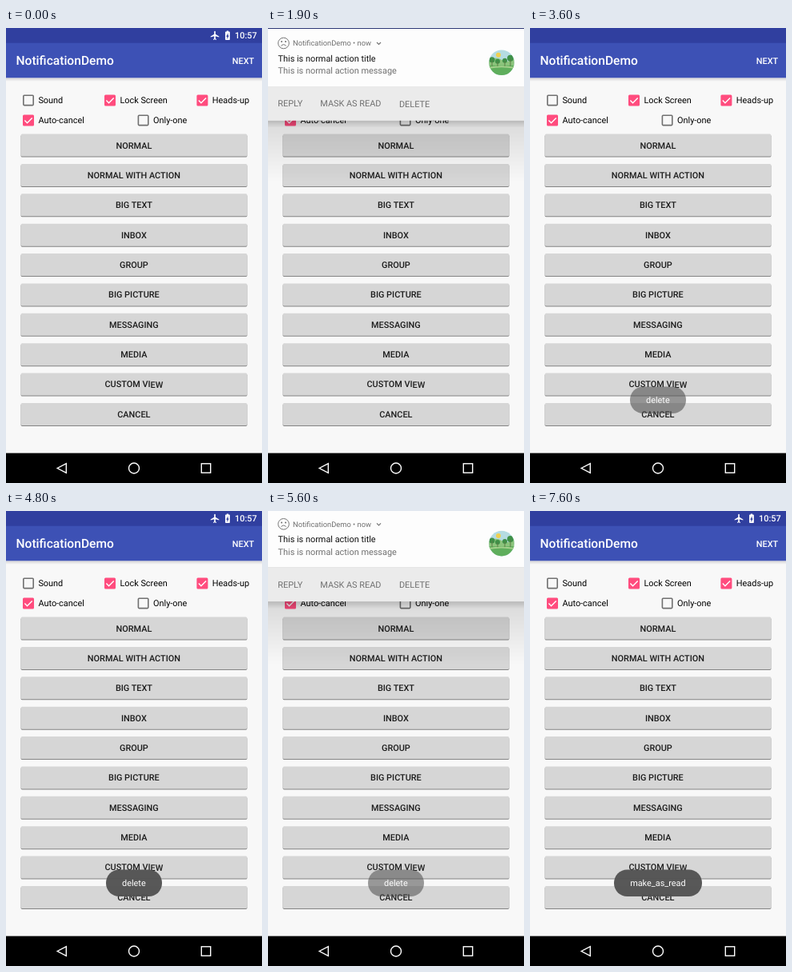
Write an HTML page that moves like this. It is 320 by 569 pixels and loops after 8 s.

```html
<!DOCTYPE html>
<html lang="en">
<head>
<meta charset="utf-8">
<title>Notification demo</title>
<style>
  html, body { margin: 0; width: 100%; height: 100%; overflow: hidden; background: #000; }
  svg { display: block; width: 100vw; height: 100vh; }
  /* The tiny rotation keeps baselines from snapping to whole pixels */
  text { font: 10.9px Roboto, sans-serif; text-rendering: geometricPrecision; transform: rotate(.015deg); }
  .medium { font-weight: 500; }
  .title { font-size: 15.57px; }
  .small { font-size: 9.34px; }
  .mid { text-anchor: middle; }
  .btn { filter: drop-shadow(0 1px .6px #0007); }

  .status, .scrim, .panel, .ripple, .tap, .toast { animation: 8s linear infinite; }
  .status { animation-name: status; }
  .scrim { animation-name: scrim; }
  .panel { animation-name: panel; }
  .ripple { animation-name: ripple; transform-box: fill-box; transform-origin: center; }
  .tap1 { animation-name: tap1; }
  .tap2 { animation-name: tap2; }
  .toast1 { animation-name: toast1; }
  .toast2 { animation-name: toast2; }

  @keyframes status {
    0%, 16.9%, 51.9%, 61.3%, 91.3%, 100% { opacity: 1; }
    18.1%, 49.4%, 62.5%, 89.4% { opacity: 0; }
  }
  @keyframes scrim {
    0%, 16.9%, 44.5%, 61.5%, 84.2%, 100% { opacity: 0; }
    18.7%, 41.7%, 63.5%, 81% { opacity: 1; }
  }
  /* Drop in, overshoot, dip back, settle; later slide out */
  @keyframes panel {
    0%, 17.62% { transform: translateY(-126px); }
    17.63% { transform: translateY(-115px); animation-timing-function: cubic-bezier(.9, 0, .8, 1); }
    22.29% { transform: translateY(14.4px); animation-timing-function: cubic-bezier(.4, 0, .2, 1); }
    25.09% { transform: translateY(-2.5px); animation-timing-function: cubic-bezier(.4, 0, .2, 1); }
    26.95% { transform: none; }
    41.63% { transform: none; animation-timing-function: ease-in; }
    44.75%, 62.07% { transform: translateY(-126px); }
    62.08% { transform: translateY(-115px); animation-timing-function: cubic-bezier(.9, 0, .8, 1); }
    66.74% { transform: translateY(14.4px); animation-timing-function: cubic-bezier(.4, 0, .2, 1); }
    69.54% { transform: translateY(-2.5px); animation-timing-function: cubic-bezier(.4, 0, .2, 1); }
    71.4% { transform: none; }
    81% { transform: none; animation-timing-function: ease-in; }
    84.25%, 100% { transform: translateY(-126px); }
  }
  @keyframes ripple {
    0%, 14.4% { transform: scale(0); opacity: .05; }
    18.75% { transform: scale(.67); opacity: .05; }
    21.25% { transform: scale(1); opacity: .05; }
    23.75% { transform: scale(1); opacity: 0; }
    23.76%, 59.9% { transform: scale(0); opacity: 0; }
    60% { transform: scale(0); opacity: .05; }
    63.75% { transform: scale(1); opacity: .05; }
    68.75%, 100% { transform: scale(1); opacity: 0; }
  }
  @keyframes tap1 {
    0%, 38.8%, 43%, 100% { opacity: 0; }
    40%, 41.6% { opacity: .05; }
  }
  @keyframes tap2 {
    0%, 77%, 82.5%, 100% { opacity: 0; }
    78.2%, 81% { opacity: .05; }
  }
  @keyframes toast1 {
    0%, 43.4%, 71.2%, 100% { opacity: 0; }
    46%, 69.2% { opacity: 1; }
  }
  @keyframes toast2 {
    0%, 83.1% { opacity: 0; }
    85.6%, 100% { opacity: 1; }
  }
</style>
</head>
<body>
<svg viewBox="0 0 320 569" preserveAspectRatio="none">
  <defs>
    <linearGradient id="dim" x2="0" y2="1">
      <stop stop-opacity=".3"/><stop offset="1" stop-opacity="0"/>
    </linearGradient>
    <linearGradient id="edge" x2="0" y2="1">
      <stop stop-opacity=".15"/><stop offset="1" stop-opacity="0"/>
    </linearGradient>
    <clipPath id="pressed"><rect x="18.6" y="170" width="282.8" height="28" rx="1.6"/></clipPath>
    <clipPath id="round"><circle cx="292" cy="42.5" r="15.8"/></clipPath>
  </defs>

  <rect width="320" height="569" fill="#f8f8f8"/>
  <rect y="62.3" width="320" height="4.5" fill="url(#edge)"/>
  <rect width="320" height="62.3" fill="#3d51b5"/>
  <rect width="320" height="18.7" fill="#303f9f"/>
  <g fill="#fff">
    <text class="medium title" x="12.5" y="46.4">NotificationDemo</text>
    <text class="medium" x="282.8" y="44.8">NEXT</text>
    <g class="status">
      <path transform="translate(254.6 2.6) scale(.56)" d="M21 16v-2l-8-5V3.5c0-.83-.67-1.5-1.5-1.5S10 2.67 10 3.5V9l-8 5v2l8-2.5V19l-2 1.5V22l3.5-1 3.5 1v-1.5L13 19v-5.5l8 2.5z"/>
      <path transform="translate(270 2.3) scale(.58)" d="M15.7 4H14V2h-4v2H8.3C7.6 4 7 4.6 7 5.3v15.4C7 21.4 7.6 22 8.3 22h7.4c.7 0 1.3-.6 1.3-1.3V5.3C17 4.6 16.4 4 15.7 4zM11 20v-5.5H9L13 7v5.5h2z"/>
      <text class="medium" x="286" y="13.4">10:57</text>
    </g>
  </g>

  <g id="checks"></g>
  <g id="buttons"></g>
  <g clip-path="url(#pressed)"><circle class="ripple" cx="150" cy="184" r="160"/></g>
  <g id="labels" fill="#1c1c1c"></g>

  <rect y="531.6" width="320" height="37.4"/>
  <g fill="none" stroke="#fff" stroke-width="1.4">
    <path d="M75.3 544.6v11.8L64.2 550.5z"/>
    <circle cx="160" cy="550.5" r="6.5"/>
    <rect x="244.3" y="544.8" width="11.4" height="11.4"/>
  </g>

  <rect class="scrim" width="320" height="192" fill="url(#dim)"/>

  <g class="panel">
    <rect y="115" width="320" height="9" fill="url(#edge)"/>
    <rect width="320" height="72.3" fill="#fdfdfd"/>
    <rect y="72.3" width="320" height="42.7" fill="#ebebeb"/>
    <g fill="none" stroke="#757575">
      <circle cx="19.5" cy="18.2" r="6.8"/>
      <path d="M16.3 21.7q3.2-3.6 6.4 0"/>
      <path d="M136 17.2l2.5 2.5 2.5-2.5" stroke-width="1.2"/>
    </g>
    <g fill="#707070">
      <circle cx="17" cy="16.3" r="1"/><circle cx="22" cy="16.3" r="1"/>
      <text class="small" x="31" y="21.5">NotificationDemo • now</text>
      <text x="12.5" y="56.4">This is normal action message</text>
      <g class="medium">
        <text x="12.3" y="97.7">REPLY</text>
        <text x="65.3" y="97.7">MASK AS READ</text>
        <text x="164" y="97.7">DELETE</text>
      </g>
    </g>
    <text x="12.5" y="41.2" fill="#111">This is normal action title</text>
    <rect class="tap tap1" x="156" y="76" width="54" height="35"/>
    <rect class="tap tap2" x="57" y="76" width="93" height="35"/>
    <g clip-path="url(#round)">
      <rect x="276" y="26" width="32" height="33" fill="#b5dce2"/>
      <circle cx="288" cy="33" r="3" fill="#f0d050"/>
      <path d="M276 40q8-6 16-1t16-2v12h-32z" fill="#8cc47c"/>
      <rect x="276" y="46" width="32" height="13" fill="#5fae5c"/>
      <path d="M276 48q16-3 32 0v2q-16-3-32 0z" fill="#a5d08c"/>
      <g fill="#3f9148">
        <circle cx="280" cy="39" r="3.5"/><circle cx="287" cy="41" r="3"/>
        <circle cx="296" cy="40" r="3"/><circle cx="303" cy="37" r="4"/>
      </g>
      <path d="M280 39v8M287 41v6M296 40v7M303 38v9" stroke="#5d7a45"/>
    </g>
  </g>

  <g class="toast toast1">
    <rect x="125" y="448.5" width="70" height="33.5" rx="16.5" fill="#525252" opacity=".96"/>
    <text class="mid" x="160" y="469" fill="#fff">delete</text>
  </g>
  <g class="toast toast2">
    <rect x="105" y="448.5" width="110" height="33.5" rx="16.5" fill="#525252" opacity=".96"/>
    <text class="mid" x="160" y="469" fill="#fff">make_as_read</text>
  </g>
</svg>
<script>
  const checks = [
    ['Sound', 28, 90.4, false], ['Lock Screen', 130, 90.4, true], ['Heads-up', 245.4, 90.4, true],
    ['Auto-cancel', 28, 115.4, true], ['Only-one', 171.6, 115.4, false]
  ];
  const buttons = ['NORMAL', 'NORMAL WITH ACTION', 'BIG TEXT', 'INBOX', 'GROUP',
    'BIG PICTURE', 'MESSAGING', 'MEDIA', 'CUSTOM VIEW', 'CANCEL'];
  const rowY = i => 146.6 + i * 37.37;
  const fill = (id, html) => { document.getElementById(id).innerHTML = html.join(''); };

  const box = on => on
    ? `<rect x="-7" y="-7" width="14" height="14" rx="1.5" fill="#ff4c7e"/>
       <path d="M-4.6 .2l3.1 3.1 6.2-6.3" fill="none" stroke="#fff" stroke-width="1.4"/>`
    : `<rect x="-6.2" y="-6.2" width="12.4" height="12.4" rx="1" fill="none" stroke="#707070" stroke-width="1.6"/>`;

  fill('checks', checks.map(([label, x, y, on]) =>
    `<g transform="translate(${x} ${y})">${box(on)}<text x="12.4" y="4">${label}</text></g>`));
  fill('buttons', buttons.map((_, i) =>
    `<rect class="btn" x="18.6" y="${rowY(i) - 14}" width="282.8" height="28" rx="1.6" fill="#d6d6d6"/>`));
  fill('labels', buttons.map((label, i) =>
    `<text class="medium mid" x="160" y="${rowY(i) + 3.9}">${label}</text>`));
</script>
</body>
</html>
```
